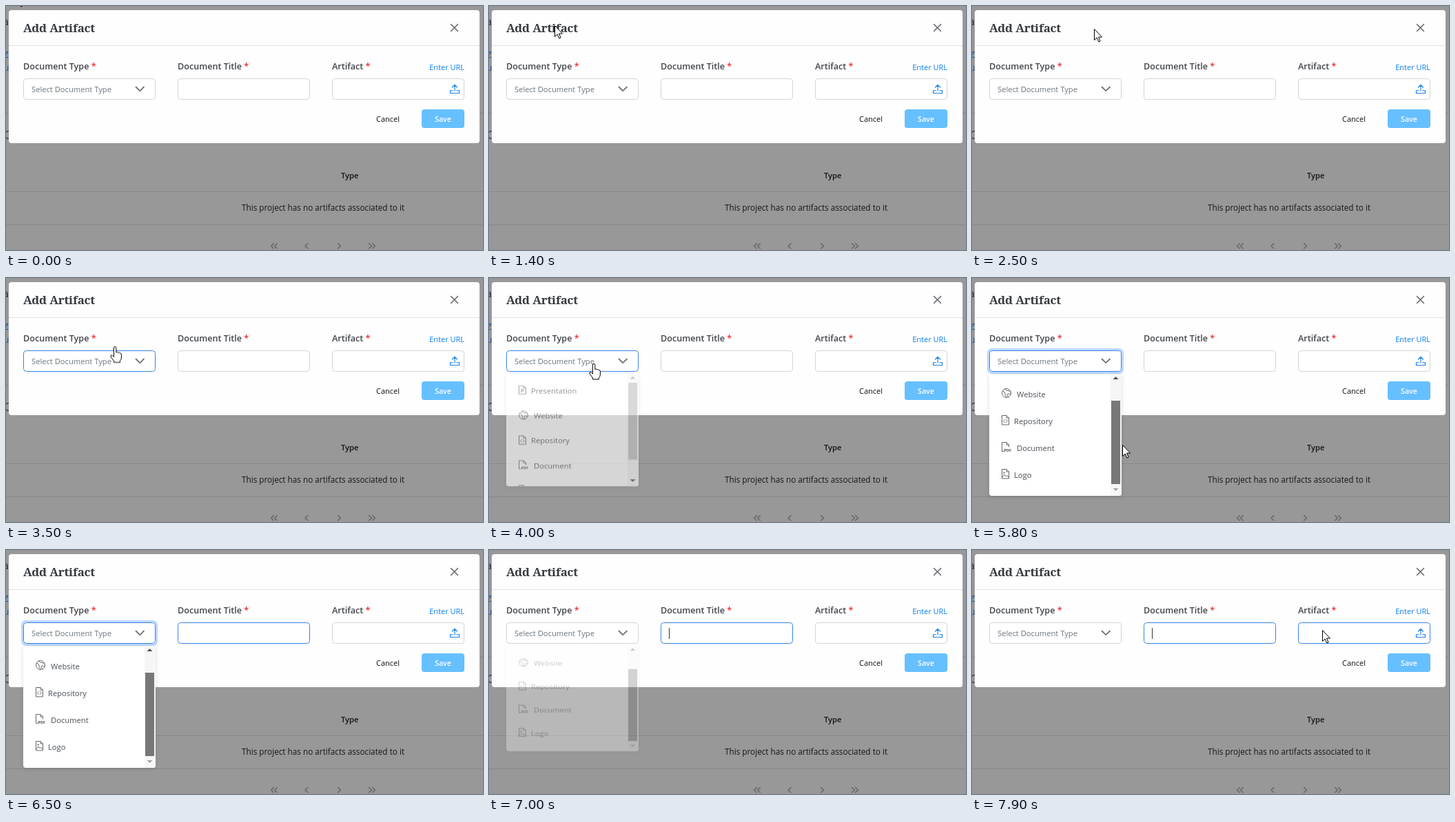
An HTML page that plays this animation: 692 by 354 pixels, repeating every 8 s.

```html
<!DOCTYPE html>
<html lang="en">
<head>
<meta charset="utf-8">
<title>Add Artifact</title>
<style>
html, body { margin: 0; width: 100%; height: 100%; overflow: hidden; background: #989898; }
svg { display: block; width: 692px; height: 354px; font-family: "Open Sans", "Noto Sans", sans-serif; font-size: 11.2px; }
.line { fill: none; stroke-linecap: round; stroke-linejoin: round; }
.label { font-size: 12.6px; font-weight: 600; fill: #41454a; }
.star { fill: #f0282d; }
.field { fill: #fff; stroke: #ced4da; }
.icon { stroke: #666; stroke-width: 1; }
.items text { fill: #495057; }

.anim { animation: 8s step-end infinite; }
.type { animation-name: type; }
.glow { animation-name: glow; fill: none; stroke: #bbd8fe; stroke-width: 3; }
.name { animation-name: name; }
.file { animation-name: file; }
.caret { animation-name: caret; }
.hover { animation-name: hover; }
.arrow { animation-name: arrow; }
.hand { animation-name: hand; }
.thumb { animation-name: thumb; }
.up { animation-name: up; }
.down { animation-name: down; }
.panel { transform-origin: 0 139px; animation: panel 8s linear infinite; }
.scroll { animation: scroll 8s linear infinite; }
.slide { animation: slide 8s linear infinite; }
.cursor { animation: cursor 8s linear infinite; }

@keyframes type { 0%, 86.25% { stroke: #ced4da } 43.75% { stroke: #3b82e6 } }
@keyframes glow { 0%, 86.25% { opacity: 0 } 50.6% { opacity: 1 } }
@keyframes name { 0% { stroke: #ced4da } 80.6%, 100% { stroke: #3b82e6 } }
@keyframes file { 0% { stroke: #ced4da } 93.7%, 100% { stroke: #3b82e6 } }
@keyframes caret { 0%, 92.5% { opacity: 0 } 86.25%, 98.75%, 100% { opacity: 1 } }
@keyframes hover { 0%, 59.5% { opacity: 0 } 56.2% { opacity: 1 } }
@keyframes arrow { 0%, 59.5%, 91.25%, 100% { opacity: 1 } 43.75%, 80.6% { opacity: 0 } }
@keyframes hand { 0%, 59.5% { opacity: 0 } 43.75% { opacity: 1 } }
@keyframes thumb { 0% { fill: #c1c1c1 } 64.5%, 100% { fill: #787878 } }
@keyframes up { 0% { fill: #a3a3a3 } 64.5%, 100% { fill: #505050 } }
@keyframes down { 0% { fill: #505050 } 66%, 100% { fill: #a3a3a3 } }

@keyframes panel {
  0%, 49.1%, 87.91%, 100% { opacity: 0; transform: scaleY(.8) }
  50.6%, 86.66% { opacity: 1; transform: none }
}
@keyframes scroll { 0%, 63.75% { transform: translateY(0) } 66.25%, 100% { transform: translateY(-37px) } }
@keyframes slide { 0%, 63.75% { transform: translateY(0) } 66.25%, 100% { transform: translateY(25px) } }
@keyframes cursor {
  0%, 3.75% { transform: translate(15px, -18px) }
  13.75%, 15% { transform: translate(70px, 20px) }
  17.5%, 18.75% { transform: translate(95px, 28px) }
  23.75%, 26.25% { transform: translate(140px, 33px) }
  28.75%, 31.25% { transform: translate(177px, 33px) }
  35%, 36.25% { transform: translate(170px, 50px) }
  47.5%, 52.5% { transform: translate(152px, 124px) }
  57.5%, 57.6% { transform: translate(200px, 157px) }
  61.25%, 63.75% { transform: translate(209px, 167px) }
  66.25%, 69.9% { transform: translate(214px, 202px) }
  70%, 72.4% { transform: translate(216px, 225px) }
  72.5%, 76.25% { transform: translate(218px, 242px) }
  81.25%, 90% { transform: translate(300px, 120px) }
  91.25% { transform: translate(447px, 116px) }
  96.25%, 100% { transform: translate(508px, 116px) }
}
</style>
</head>
<body>
<svg viewBox="0 0 692 354" xmlns="http://www.w3.org/2000/svg">
  <defs>
    <path id="sheet" d="M.5 13.5V.5H7L10.5 4v9.5zM7 .5V4h3.5"/>
    <clipPath id="list"><path d="M25 139H217V312q0 4-4 4H29q-4 0-4-4z"/></clipPath>
    <filter id="soft" x="-10%" y="-10%" width="120%" height="120%">
      <feDropShadow dx="0" dy="1" stdDeviation="3" flood-opacity=".12"/>
    </filter>
  </defs>

  <!-- dimmed page -->
  <rect width="692" height="354" fill="#989898"/>
  <path d="M0 155.5H692M0 269.5H692M0 317.5H692" stroke="#868686"/>
  <text x="-4" y="28" font-size="14" fill="#222">a</text>
  <g font-size="12" fill="#0a4fa3">
    <text x="-3" y="75">Z</text>
    <text x="-3" y="94">u</text>
  </g>
  <text x="-3" y="193" font-size="17" fill="#333">O</text>
  <text x="486" y="250" font-size="11.1" font-weight="600" fill="#111">Type</text>
  <text x="342" y="297" font-size="11.75" fill="#161616">This project has no artifacts associated to it</text>
  <g class="line" stroke="#5c6064" stroke-width="1.2">
    <path d="M388.5 344.5l-4 3.7 4 3.7M393.5 344.5l-4 3.7 4 3.7"/>
    <path d="M438 344.5l-4 3.7 4 3.7M481.500 344.500l4 3.700-4 3.700"/>
    <path d="M526.500 344.500l4 3.700-4 3.700M531.500 344.500l4 3.700-4 3.700"/>
  </g>

  <!-- dialog -->
  <rect x="4" y="6" width="683" height="193" rx="4" fill="#fefefe"/>
  <path d="M4 57.5H687" stroke="#dee2e6"/>
  <text x="25" y="38" font-family="'Noto Serif', serif" font-size="17" font-weight="600" letter-spacing="-.2" fill="#343a40">Add Artifact</text>
  <path class="line" d="M645.500 26.500l10 10m0-10l-10 10" stroke="#60666c" stroke-width="1.500"/>

  <g class="label">
    <text x="25" y="92">Document Type <tspan class="star">*</tspan></text>
    <text x="249" y="92">Document Title <tspan class="star">*</tspan></text>
    <text x="473" y="92">Artifact <tspan class="star">*</tspan></text>
  </g>
  <text x="665" y="93" text-anchor="end" font-size="11" font-weight="500" fill="#0a7cf5">Enter URL</text>

  <rect class="anim glow" x="23.500" y="103.500" width="195" height="34" rx="5"/>
  <rect class="field anim type" x="25.500" y="105.500" width="191" height="30" rx="4"/>
  <rect class="field anim name" x="249.500" y="105.500" width="191" height="30" rx="4"/>
  <rect class="field anim file" x="473.500" y="105.500" width="191" height="30" rx="4"/>
  <text x="37" y="125" fill="#6c757d">Select Document Type</text>
  <path class="line" d="M188.500 117.500l5.700 5.700 5.700-5.700" stroke="#6c757d" stroke-width="1.800"/>
  <path class="anim caret" d="M261.500 113V129" stroke="#333"/>
  <path class="line" d="M651 123V114.500m-3.500 3.500l3.500-3.500 3.500 3.500M648 122.500h-3.500v4h13v-4H654" stroke="#1f80f5" stroke-width="1.200"/>

  <text x="537" y="168" font-size="11" font-weight="500" fill="#111">Cancel</text>
  <rect x="603" y="150" width="62" height="27" rx="4" fill="#66bfff"/>
  <text x="634" y="168" text-anchor="middle" font-size="10.700" font-weight="600" fill="#fff">Save</text>

  <!-- type list -->
  <g class="panel">
    <path d="M25 139H217V312q0 4-4 4H29q-4 0-4-4z" fill="#fff" filter="url(#soft)"/>
    <g clip-path="url(#list)">
      <g class="scroll items">
        <rect class="anim hover" x="25" y="147" width="176" height="39" fill="#e9eaed"/>
        <g class="line icon">
          <g transform="translate(43 157)"><use href="#sheet"/><path d="M4 11V6h2q1.500 0 1.500 1.500T6 9H4"/></g>
          <g transform="translate(43 197)">
            <circle cx="7" cy="7" r="6.500"/>
            <path d="M1.500 4q4 1 3.500 4t2 5M5 1q1 3 4 2.500t4 2M13 9q-4-2-5 0t2 4"/>
          </g>
          <g transform="translate(43 236)"><use href="#sheet"/><path d="M4.300 6.500L2.500 8.500l1.800 2M6.700 6.500l1.800 2-1.800 2"/></g>
          <g transform="translate(43 275)"><path d="M3 13.500H.5V.5H7L10.500 4v3M7 .5V4h3.500"/></g>
          <g transform="translate(43 314)"><use href="#sheet"/><path d="M1 12l3-4 2.500 3L8 9.500l2 2.500"/><circle cx="3.500" cy="5.500" r=".8"/></g>
        </g>
        <text x="46.500" y="289" font-size="5.500" font-weight="700">PDF</text>
        <text x="61" y="170">Presentation</text>
        <text x="65" y="209.500">Website</text>
        <text x="61" y="248.500">Repository</text>
        <text x="65" y="288">Document</text>
        <text x="61" y="327">Logo</text>
      </g>
      <rect x="201" y="139" width="16" height="177" fill="#f6f6f6"/>
      <g class="slide"><rect class="anim thumb" x="202" y="153" width="13" height="121"/></g>
      <path class="anim up" d="M204.500 147l4-4 4 4z"/>
      <path class="anim down" d="M204.500 305l4 4 4-4z"/>
    </g>
  </g>

  <g class="cursor" fill="#fff" stroke="#000" stroke-linejoin="round">
    <path class="anim arrow" d="M.5 .5v16l3.700-3.500 2.600 6 2.300-1-2.600-5.900h5z"/>
    <path class="anim hand" d="M-1.600 15V2a1.700 1.700 0 0 1 3.400 0V8.500q1.600-1.200 3 .5 1.600-.9 2.600.7 2-.4 2 1.800V16q0 3-2 4.500V23H-1.500V21L-5.800 15q-1-2.200.8-2.400 1.400 0 3.400 2.400z"/>
  </g>
</svg>
</body>
</html>
```
